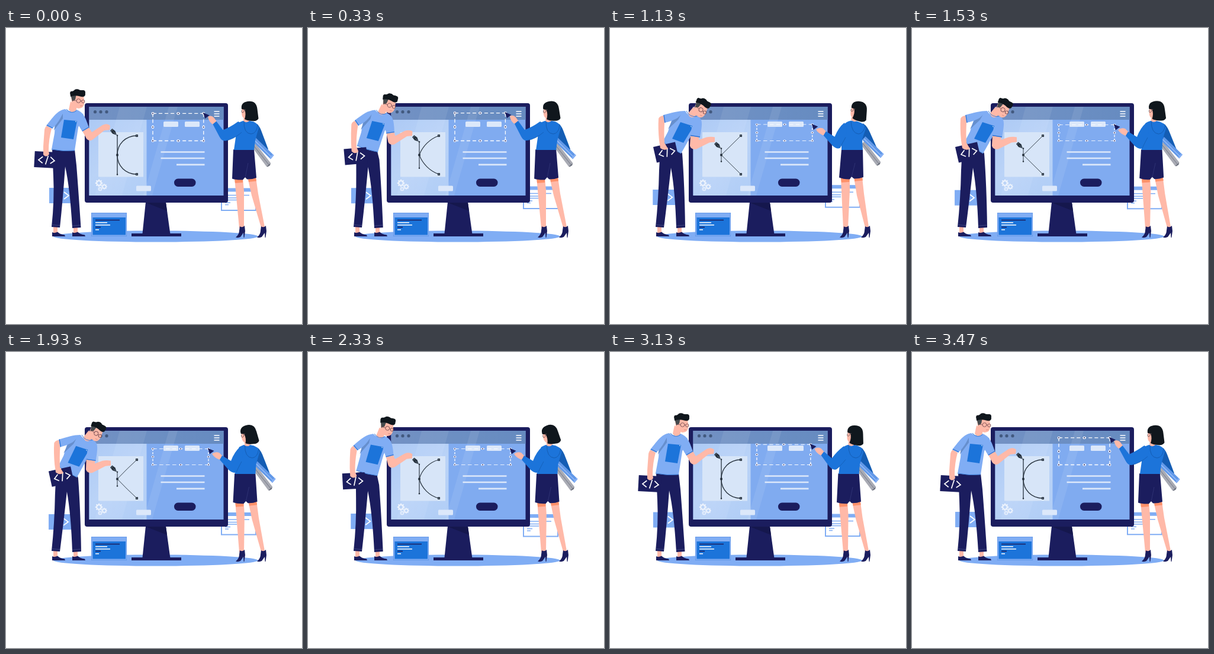
Animation, 500 px wide and 500 px high, one loop 3.51 s. Source, as an HTML page with a canvas:

```html
<!DOCTYPE html>
<html lang="en">
<head>
<meta charset="utf-8">
<title>Design team</title>
<style>
html, body { margin: 0; width: 100%; height: 100%; overflow: hidden; background: #fff; }
canvas { display: block; width: 500px; height: 500px; }
</style>
</head>
<body>
<canvas id="stage" width="500" height="500"></canvas>
<script>
const ctx = document.getElementById('stage').getContext('2d');
const LOOP = 3510;
const NAVY = '#1b1d5e', BLUE = '#1c74da', SKY = '#80adf4', SKIN = '#ffb9a8', HAIR = '#10171d',
      PALE = '#dce8fa', DARK = '#25303c', SHADE = '#145db4';

// Each key is [time, value]; tangents vanish at extremes.
const tracks = {
  bow: [[0, 0], [180, .15], [360, .55], [530, .82], [730, .91], [1130, 1], [1600, 1], [1930, .96],
        [2130, .83], [2330, .38], [2500, .13], [2730, .02], [3000, 0], [LOOP, 0]],
  resize: [[0, .03], [200, 0], [730, -.02], [870, .28], [1000, .78], [1130, .97], [1500, 1], [2730, 1],
           [2950, .9], [3200, .5], [3350, .2], [3470, .06], [LOOP, .03]],
  lean: [[0, 0], [730, .1], [900, .45], [1130, 1], [1300, .8], [1600, .38], [1930, .3], [2730, .3],
         [3200, .18], [3470, 0], [LOOP, 0]],
  nod: [[0, 0], [730, -5], [1130, 11], [1500, 0], [1930, -9], [2330, -12], [2730, 10], [3100, 6], [LOOP, 0]]
};

function sample(keys, t) {
  let i = 0;
  while (i < keys.length - 2 && keys[i + 1][0] <= t) i++;
  const slope = k => (keys[k + 1][1] - keys[k][1]) / (keys[k + 1][0] - keys[k][0]);
  const tangent = k => {
    if (k === 0 || k === keys.length - 1) return 0;
    const a = slope(k - 1), b = slope(k);
    return a * b <= 0 ? 0 : 2 * a * b / (a + b);
  };
  const [t0, v0] = keys[i], [t1, v1] = keys[i + 1];
  const d = t1 - t0, u = (t - t0) / d, u2 = u * u, u3 = u2 * u;
  return v0 * (2 * u3 - 3 * u2 + 1) + v1 * (3 * u2 - 2 * u3) +
    d * (tangent(i) * (u3 - 2 * u2 + u) + tangent(i + 1) * (u3 - u2));
}

const mix = (a, b, k) => a + (b - a) * k;

// Blends two path strings that share the same commands.
function morph(a, b, k) {
  const ends = b.match(/-?[\d.]+/g);
  let i = 0;
  return a.replace(/-?[\d.]+/g, n => mix(+n, +ends[i++], k).toFixed(3));
}

function fill(path, color) {
  ctx.fillStyle = color;
  ctx.fill(new Path2D(path));
}

function stroke(path, color, width = 1) {
  ctx.strokeStyle = color;
  ctx.lineWidth = width;
  ctx.stroke(new Path2D(path));
}

function box(x, y, w, h, color, r = 0) {
  ctx.fillStyle = color;
  ctx.beginPath();
  ctx.roundRect(x, y, w, h, r);
  ctx.fill();
}

function dot(x, y, r, color) {
  ctx.fillStyle = color;
  ctx.beginPath();
  ctx.arc(x, y, r, 0, Math.PI * 2);
  ctx.fill();
}

function ring(x, y, r, color, width) {
  ctx.strokeStyle = color;
  ctx.lineWidth = width;
  ctx.beginPath();
  ctx.arc(x, y, r, 0, Math.PI * 2);
  ctx.stroke();
}

function placed(x, y, degrees, draw) {
  ctx.save();
  ctx.translate(x, y);
  ctx.rotate(degrees * Math.PI / 180);
  draw();
  ctx.restore();
}

function blend(x0, y0, x1, y1, ...colors) {
  const g = ctx.createLinearGradient(x0, y0, x1, y1);
  colors.forEach((c, i) => g.addColorStop(i / (colors.length - 1), c));
  return g;
}

function drawBackWindows(t) {
  const phase = 2 * Math.PI * t / LOOP;
  placed(-.5 + .5 * Math.cos(phase), 2 - 2 * Math.cos(phase), 0, () => {
    box(73, 270, 38, 26, SKY);
    stroke('M98 277 L106 283 L98 289', '#fff', 1.8);
  });
  placed(0, -1 - 5 * Math.sin(phase - .09), 0, () => {
    box(363, 271, 60, 38.5, SKY);
    box(365, 277, 56, 30.5, '#fff');
    stroke('M370 283 H411 M370 287.5 H390 M370 291 H390 M370 295.5 H379 M370 299 H376', SKY, 1.5);
  });
}

function drawGear(x, y, r) {
  ring(x, y, r * .72, '#eef4fd', r * .42);
  for (let i = 0; i < 8; i++) {
    placed(x, y, i * 45, () => box(r * .8, -r * .2, r * .4, r * .4, '#eef4fd'));
  }
}

function drawMonitor() {
  fill('M236 294 H270 L278 352 H230 Z', NAVY);
  fill('M236 295 H270 L272 309 Z', '#15174d');
  box(212, 347, 84, 5, NAVY);
  box(133, 127, 242, 168, NAVY, 4);
  box(140.5, 133, 227, 150, '#80abf0');
  box(140.5, 155, 97, 128, blend(140, 155, 238, 283, '#adcaf5', '#bad3f7', '#b0cdf6'));
  box(140.5, 133, 227, 22, blend(140, 0, 367, 0, '#7391c3', '#6c8fc3', '#668bc0'));
  ctx.save();
  ctx.beginPath();
  ctx.rect(140, 133, 227, 150);
  ctx.clip();
  fill('M192 133 H238 L196 283 H150 Z', 'rgba(255,255,255,.07)');
  fill('M275 133 H290 L247 283 H232 Z', 'rgba(255,255,255,.08)');
  ctx.restore();
  for (const x of [150.5, 160, 170]) dot(x, 141.7, 2.6, '#42597f');
  stroke('M351.5 141 H360.5 M351.5 145 H360.5 M351.5 149 H360.5', '#fff', 1.6);
  box(156, 176, 76, 75.5, '#d7e5f8');
  box(266, 158, 25, 9, PALE, 1.5);
  box(302, 158, 25, 9, PALE, 1.5);
  box(220, 266.5, 25, 9, PALE, 1.5);
  stroke('M261.5 209.5 H335.5 M261.5 220 H335.5 M288 230.8 H335.5', PALE, 2.7);
  box(284, 254.5, 36.5, 13.5, NAVY, 6.5);
  drawGear(157, 262, 5.2);
  drawGear(166, 268, 4);
  drawGear(159, 272, 3);
}

function drawFrontWindow() {
  box(144, 312, 60, 40, '#5d94e5');
  box(144.7, 312.7, 58.6, 38.6, SKY);
  box(146.5, 320, 55.5, 29.5, BLUE);
  stroke('M151 324.5 H192 M151 336.5 H160', NAVY, 1.5);
  stroke('M151 328.7 H171 M151 332.7 H176 M151 340.7 H157', '#fff', 1.5);
}

function drawCurve(bow) {
  const reach = mix(33, 11, bow), width = mix(1.3, .9, bow);
  stroke(morph('M221 182 C202 182 188 196 188 214.5 C188 233 202 247 221 247',
               'M221 182 C210 192.8 199 203.7 188 214.5 C199 225.3 210 236.2 221 247', bow), DARK, width);
  stroke(`M188 ${214.5 - reach} V${214.5 + reach}`, DARK, width);
  box(186.2, 212.7, 3.6, 3.6, DARK);
  for (const y of [182, 247]) {
    box(219, y - 2, 4, 4, DARK);
    box(220.2, y - .8, 1.6, 1.6, '#8c9bab');
  }
  for (const s of [-1, 1]) dot(188, 214.5 + s * reach, 1.2, DARK);
}

function drawSelection(k) {
  const left = 248, right = mix(333.5, 342, k), top = mix(143.8, 163.5, k), bottom = 190.5;
  const sx = (right - left) / 85.5, sy = (bottom - top) / 46.7;
  ctx.setLineDash([6 * sx, 4 * sx]);
  stroke(`M${left} ${top} H${right} M${left} ${bottom} H${right}`, '#fff', mix(1.3, .8, k));
  ctx.setLineDash([6 * sy, 4 * sy]);
  stroke(`M${left} ${top} V${bottom} M${right} ${top} V${bottom}`, '#fff', 1.3);
  ctx.setLineDash([]);
  const h = 4.2 * mix(1, .68, k);
  for (const u of [0, .5, 1]) for (const v of [0, .5, 1]) {
    if (u === .5 && v === .5) continue;
    const x = mix(left, right, u), y = mix(top, bottom, v);
    box(x - 2.1, y - h / 2, 4.2, h, '#fff', 1);
    box(x - .9, y - h * .22, 1.8, h * .44, NAVY);
  }
}

function drawManHead(bow) {
  placed(mix(121, 154.5, bow), mix(118, 133, bow), 27 * bow, () => {
    ctx.translate(-121, -118);
    fill('M109 124 L106 138 Q112 146 119 138 L119 132 Z', SKIN);
    fill('M110 114 L131 114 L132.5 125 Q132 136 123 136 Q113 135 111 125 Z', SKIN);
    fill('M109 112 L119 111 L117 121 L112 124 Z', '#454a4d');
    fill('M109 116 Q107 108 114 106 Q120 101 125 105 Q133 104 134 112 Q134 117 127 116 Q118 113 112 115 Z', HAIR);
    dot(111.5, 110, 3.3, HAIR);
    dot(118.5, 107, 3.4, HAIR);
    dot(130, 109, 4, HAIR);
    ring(122.5, 123, 3.4, '#744f55', .9);
    ring(130.3, 124, 2.6, '#744f55', .9);
    stroke('M113 122 L119 123 M126 123.3 H128', '#744f55', .8);
    stroke('M125 131.5 Q127 132 129 131', '#d58478', .8);
  });
}

function drawMan(bow) {
  const pose = (a, b) => morph(a, b, bow);
  box(80, 334, 7, 13, SKIN);
  box(114, 334, 7, 13, SKIN);
  for (const x of [0, 34]) {
    fill(`M${78 + x} 345 Q${82 + x} 347 ${87 + x} 344.5 Q${92 + x} 349 ${99 + x} 349.5 L${100 + x} 352 H${78 + x} Z`, NAVY);
  }
  fill(pose('M78 206 L116 205 L119 232 Q122 270 126.5 337 L112 338 Q108 270 100 234 Q96 290 91 337 L77 336 Q82 290 80 250 Z',
            'M85 201 L113 191 L122 212 Q126 265 127 337 L112 338 Q110 275 103 236 Q97 290 91 337 L77 336 Q82 290 83 240 Z'), NAVY);
  stroke('M77.5 332.5 L91 333.5 M112 334 L126 333', '#4a528c', .7);

  fill(pose('M100 137 Q109 144 119 138 L131 146 L122 168 L116 207 Q97 209 77 205 L82 178 L84 150 Z',
            'M127 140 Q133 151 147 149 L154 158 L137 182 L120 212 Q104 204 89 192 L98 175 L106 150 Z'), SKY);
  stroke(pose('M77 205 Q97 209 116 207', 'M89 192 Q104 204 120 212'), '#3b7dd7', 1);
  fill(pose('M98 155 L120 157 L114 188 L93 185 Z', 'M119 159 L141 166 L124 194 L105 187 Z'), BLUE);
  stroke(pose('M117 158 L119 158', 'M136 166 L138 167'), '#fff', .9);
  fill(pose('M96 139 L96 153 L81 173 L84 158 Z', 'M122 142 L115 155 L98 171 L106 154 Z'), '#668fce');

  placed(mix(67, 94.5, bow), mix(222.5, 210, bow), mix(3, -13, bow), () => {
    box(-19, -13.5, 38, 27, NAVY);
    stroke('M-5 -5 L-12 1 L-5 6 M4 -7 L0 8 M8 -5 L15 1 L8 6', '#fff', 1.7);
  });
  fill(pose('M69 165 L77 170 Q72 188 72 207 L73 213 Q68 220 63 214 L63 200 Q64 185 65 172 Q66 167 69 165 Z',
            'M92 148 L92 160 Q91 180 92 194 L98 204 Q92 208 85 203 L83 190 Q81 170 82 153 Q84 148 92 148 Z'), SKIN);
  fill(pose('M100 137 C88 139 82 147 68 165 L78 170 Q86 163 92 152 Z',
            'M127 140 C115 140 105 143 90 147 L92 160 Q106 157 114 152 Z'), SKY);
  stroke(pose('M69 164 L79 169', 'M91 147 L93 160'), '#2f76d6', 1.3);

  drawManHead(bow);
  stroke(pose('M102 137 Q110 147 120 139', 'M129 140 Q135 152 148 149'), '#3b7dd7', 1);

  placed(187, mix(181, 203.5, bow), 0, () => {
    fill('M0 0 L-7 -2.5 L-11 -7.5 L-7.5 -11 L-2.5 -7 Z', DARK);
    stroke('M-1 -1 L-5.5 -5.5 M-10 -6 L-6 -10', '#8999a8', .7);
  });
  fill(pose('M129 174 L140 168 L145 176 L163 164 Q171 160 176 165 L175 172 L166 173 L146 189 Q140 192 136 187 Z',
            'M136 182 L151 184 L150 189 L163 184.5 Q171 183 177 184.5 L177 192.5 L168 193.5 L146 204.5 Q137 206 135 199 Z'), SKIN);
  fill(pose('M119 138 C130 142 134 150 140 168 L129 175 L120 160 Z',
            'M147 149 C156 153 157 158 152 185 L136 182 L138 168 Z'), SKY);
  stroke(pose('M129 174 L140 167.5', 'M136 181.5 L152 184'), '#2f76d6', 1.3);
}

function drawWoman(resize, lean, nod) {
  const pose = (a, b) => morph(a, b, lean);
  const reach = (a, b) => morph(a, b, resize);

  fill(pose('M386 252 L400 254 L402 275 L402 338 L394 338 L388 275 Z',
            'M390 252 L405 254 L405 275 L402 338 L394 338 L391 275 Z'), SKIN);
  fill(pose('M408 252 L422 252 L426 280 L437 336 L431 337 L415 283 Z',
            'M412 252 L426 252 L429 280 L437 336 L431 337 L417 283 Z'), SKIN);
  fill(pose('M386 254 L400 255 L400 261 L387 262 Z M409 254 L422 253 L423 258.5 L410 260 Z',
            'M390 254 L405 254 L404 260 L391 261 Z M413 253 L426 252 L427 257.5 L413 259 Z'), '#ff9169');
  for (const x of [0, 36]) {
    fill(`M${395 + x} 335 Q${399 + x} 338 ${403 + x} 334 L${404 + x} 343 L${402.5 + x} 354 H${401.5 + x} L${401 + x} 346 L${396 + x} 353 Q${392 + x} 355 ${388 + x} 353.5 Q${394 + x} 349 ${394 + x} 342 Z`, NAVY);
  }

  fill(pose('M422 161 Q427 163 431 173 L443 205 L438 206 L419 188 Z',
            'M427 161 Q433 164 438 174 L451 203 L446 204 L424 187 Z'), SHADE);
  placed(mix(0, 10, lean), mix(0, -2, lean), 0, () => {
    fill('M414 199 L420 193 L447 228 L440 234 Z', '#a9abb4');
    stroke('M417 197 L444 231', '#747987', 1);
    fill('M440 234 L447 228 L446 232 L442 234.5 Z', '#696e7b');
    fill('M416 191 L421.5 185 L452.5 215 L447 221.5 Z', '#6198e8');
    stroke('M419 189 L449 218.5', '#9dc1fa', 1.3);
    fill('M445 219.5 L450.5 213 L452.5 215 L447 221.5 Z', '#86b0f5');
  });

  fill(pose('M384 205.3 L419 205.3 L423 253 Q415 256 407 255.5 L404 252 L400 256.5 Q389 257 382 254.5 Z',
            'M391 205.3 L427 205.3 L428 252 Q420 255 412 254.5 L408 251 L405 255.5 Q395 256 387 252.5 Z'), NAVY);
  stroke(pose('M409 228 L404 253', 'M414 228 L408 252'), '#363a7c', .7);
  fill(pose('M393 160 Q404 154 412 157 Q424 158 427 168 L421 190 L419 206 L385 206 L388 185 L389 170 Z',
            'M396 162 Q404 155 414 157 Q430 160 432 170 L426 188 L427 206 L391 206 L391 190 L391 172 Z'), BLUE);
  stroke(pose('M402 157 Q401 178 414 179 Q424 178 425 163', 'M407 157 Q408 178 420 179 Q429 178 431 164'), SHADE, 1);

  placed(mix(407, 413, lean), mix(156, 155, lean), nod, () => {
    ctx.translate(-407, -156);
    fill('M402 145 L401 157 Q407 162 412 156 L412 145 Z', SKIN);
    fill('M399 135 L398 143 Q398 152 404 153 L410 148 L408 134 Z', SKIN);
    fill('M398 137 Q396 126 408 124 Q423 122 424.5 137 L426.5 153 Q424 158 416 157 Q408 157 403 154 Q406 145 403 138 Z', HAIR);
    stroke('M398.5 138.5 Q397 143 400 143 Q403 142 402 138 L405 138', '#5d5056', .8);
  });

  placed(mix(333, 341, resize), mix(142.5, 162.5, resize), 0, () => fill('M0 0 L10.5 4.5 L7 7 L3 10 Z', NAVY));
  fill(reach('M341 149 Q347 146 351 151 L356 158 L350 163 Q342 158 341 149 Z',
             'M348 172 Q353 168 360 170 L366 176 L361 182 Q352 179 348 172 Z'), SKIN);
  fill(reach('M392 158 Q404 162 398 176 Q384 188 370 190 Q364 191 360 183 L349 162 L355 157 L366 172 Q378 168 392 158 Z',
             'M396 160 Q402 170 398 185 Q392 196 389 203 Q384 206 376 199 L361 182 L365 175 L380 184 Q386 168 396 160 Z'), BLUE);
  stroke(reach('M398 176 Q384 188 370 190', 'M398 185 Q392 196 389 203'), SHADE, .8);
}

function render(t) {
  const bow = sample(tracks.bow, t), resize = sample(tracks.resize, t);
  ctx.fillStyle = '#fff';
  ctx.fillRect(0, 0, 500, 500);
  ctx.fillStyle = SKY;
  ctx.beginPath();
  ctx.ellipse(253, 352, 173, 9.6, 0, 0, Math.PI * 2);
  ctx.fill();
  drawBackWindows(t);
  drawMonitor();
  drawFrontWindow();
  drawCurve(bow);
  drawSelection(resize);
  drawMan(bow);
  drawWoman(resize, sample(tracks.lean, t), sample(tracks.nod, t));
}

const start = performance.now();
function tick() {
  render((performance.now() - start) % LOOP);
  requestAnimationFrame(tick);
}
tick();
</script>
</body>
</html>
```
